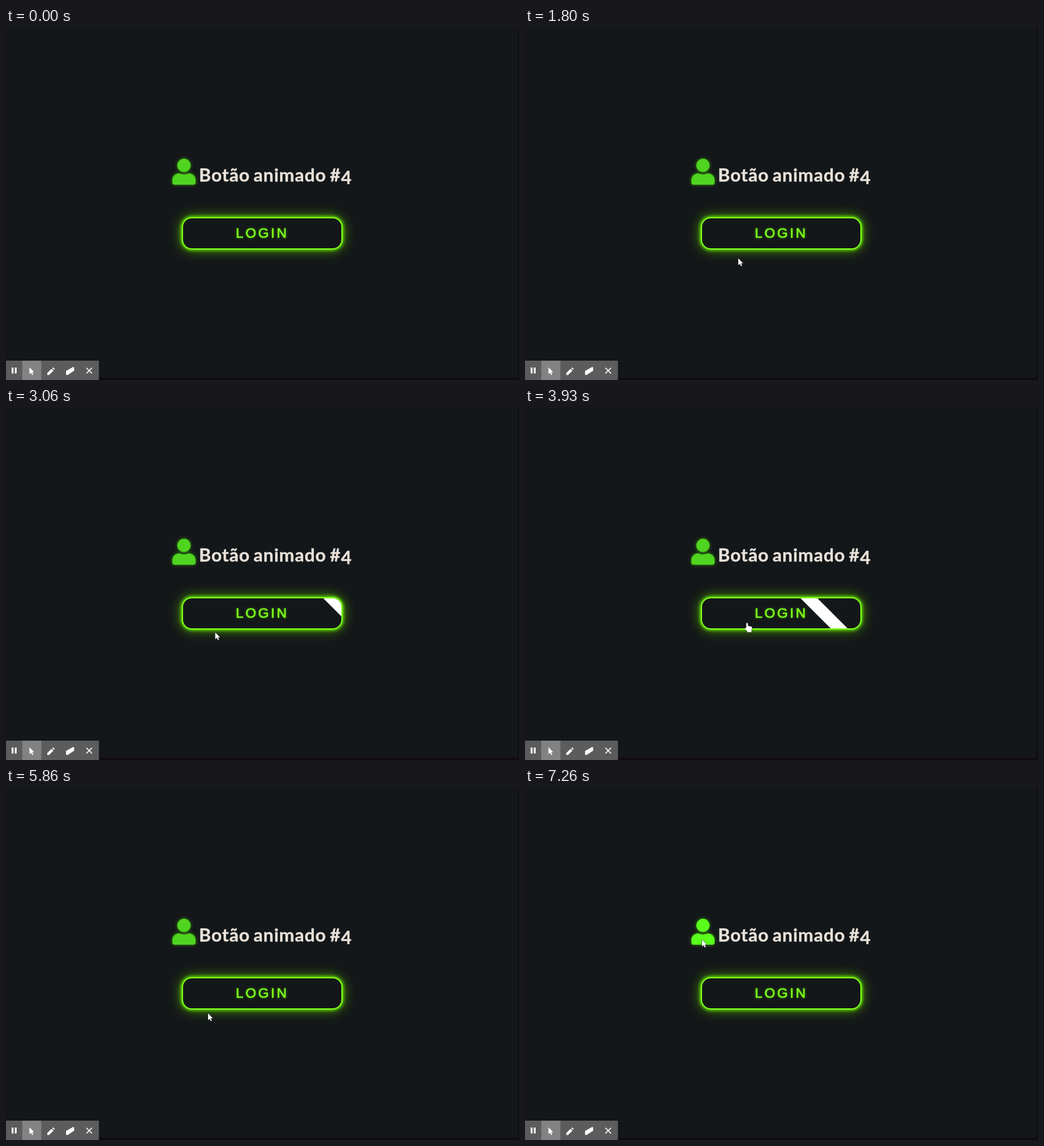
Recreate the animation shown at these times as an HTML page. Size 820 by 564 pixels, loop 8 s.

```html
<!DOCTYPE html>
<html lang="pt">
<head>
<meta charset="utf-8">
<style>
html, body { margin: 0; width: 100%; height: 100%; overflow: hidden; background: #141719; }
#stage { position: relative; width: 820px; height: 564px; overflow: hidden; }
svg { position: absolute; left: 0; top: 0; }
#title {
  font: bold 29px Lato, sans-serif; letter-spacing: .8px; word-spacing: -2px;
  fill: #e9e2da; stroke: #e9e2da; stroke-width: .4px;
}
#user { fill: #4fd41f; filter: drop-shadow(0 0 2.5px #3aa80e); }
#user.hover { fill: #5aff1c; }
#button {
  position: absolute; left: 281px; top: 303px; width: 257px; height: 52px;
  box-sizing: border-box; overflow: hidden;
  border: 2px solid #80ff1c; border-radius: 16px;
  box-shadow: 0 0 5px 1px #6cf808, 0 0 19px 1px #4a9800;
  background: #141719; color: #7dff1c; text-align: center;
  font: 22px/48px "Liberation Sans", Arial, sans-serif; letter-spacing: 3.2px;
  -webkit-text-stroke: .7px #7dff1c; text-shadow: 0 0 4px #3c9600;
}
#stripe {
  position: absolute; left: 0; top: 0; width: 75px; height: 48px; background: #fff;
  clip-path: polygon(0 0, 27px 0, 100% 100%, 48px 100%);
}
</style>
</head>
<body>
<div id="stage">
  <svg width="820" height="564">
    <defs>
      <path id="arrow" d="M0 0V11L2.6 8.7L4.3 12.5L6 11.7L4.4 8H7.6Z"/>
    </defs>
    <rect y="560.5" width="820" height="4" fill="#100b10"/>
    <rect x="818.7" width="2" height="564" fill="#08090a"/>
    <g id="user">
      <circle cx="284.5" cy="220.2" r="10.6"/>
      <path d="M277 233Q284.5 236.6 292 233C299 233 303 238 303 244V247.5Q303 251 299.5 251H269.5Q266 251 266 247.5V244C266 238 270 233 277 233Z"/>
    </g>
    <text id="title" x="308.5" y="246">Botão animado #<tspan dy="4">4</tspan></text>
    <rect y="533" width="148.5" height="31" fill="#5c5c5c"/>
    <rect x="26" y="533" width="30.5" height="31" fill="#828282"/>
    <g fill="#fff">
      <path d="M9 544h3v9.500h-3zM14 544h3v9.500h-3z"/>
      <use href="#arrow" x="37.5" y="543.5"/>
      <path d="M66 556V552.8L73 546L75.800 548.900L68.800 556ZM74 545L75.500 543.800L77.900 546.200L76.700 547.800Z"/>
      <path d="M96 549.5L107 543.2L109 543.8V549L98.500 556L96 555.5Z"/>
      <path d="M128.5 544.5l9 9m0-9l-9 9" stroke="#fff" stroke-width="1.6"/>
    </g>
  </svg>
  <div id="button">LOGIN<div id="stripe"></div></div>
  <svg width="820" height="564">
    <g id="pointer" fill="#fff" stroke="#141719" stroke-width=".8" paint-order="stroke">
      <use id="tip" href="#arrow"/>
      <path id="hand" d="M-1.3 1Q0-.9 1.3 1V4.8L6.5 6Q8 6.5 8 8.2L7 13V15H.3V13.3L-3.4 9.4Q-4 8-2.6 7.6L-1.3 8.4Z"/>
    </g>
  </svg>
</div>
<script>
const $ = id => document.getElementById(id);
const LOOP = 8000, SHOW = 60, SWEEP = 500, LEFT = 160, RIGHT = 580;

// The pointer bobs across the button's lower edge, then visits these stops
const stops = [
  { t: 4300, x: 349, y: 345 },
  { t: 4600, x: 637, y: 383 },
  { t: 4730, x: 690, y: 395 },
  { t: 4930, x: 690, y: 395 },
  { t: 5860, x: 323, y: 361 },
  { t: 7260, x: 283, y: 243 }
];

function pointerAt(t) {
  if (t < stops[0].t) return {
    x: 340 + 15 * Math.cos(2 * Math.PI * (t - 1130) / 2800),
    y: 355 - 14.6 * Math.sin(2 * Math.PI * (t - 2242) / 1493)
  };
  const i = stops.findIndex(s => s.t > t);
  if (i < 0) return stops[stops.length - 1];
  const a = stops[i - 1], b = stops[i];
  const p = (t - a.t) / (b.t - a.t), s = p * p * (3 - 2 * p);
  return { x: a.x + (b.x - a.x) * s, y: a.y + (b.y - a.y) * s };
}

const inside = (p, l, t, r, b) => p.x > l && p.x < r && p.y > t && p.y < b;
const onButton = t => inside(pointerAt(t), 281, 303, 538, 355);

// Times at which the pointer enters and leaves the button, in turn
const toggles = [];
for (let t = SHOW; t < LOOP; t++)
  if (onButton(t) !== (toggles.length % 2 === 1)) toggles.push(t);

// CSS "ease" curve
function ease(x) {
  if (x >= 1) return 1;
  const bez = (a, b, s) => 3 * a * s * (1 - s) ** 2 + 3 * b * s * s * (1 - s) + s ** 3;
  let lo = 0, hi = 1;
  for (let i = 0; i < 20; i++) {
    const mid = (lo + hi) / 2;
    if (bez(.25, .25, mid) < x) lo = mid; else hi = mid;
  }
  return bez(.1, 1, lo);
}

function draw(t) {
  const past = toggles.filter(k => k <= t);
  const over = past.length % 2 === 1;
  const p = past.length ? ease((t - past[past.length - 1]) / SWEEP) : 1;
  const x = LEFT + (RIGHT - LEFT) * (over ? p : 1 - p);
  $("stripe").style.transform = `translateX(${x - 283}px)`;

  const pos = pointerAt(t);
  $("pointer").setAttribute("transform", `translate(${pos.x} ${pos.y})`);
  $("pointer").style.display = t < SHOW ? "none" : "";
  $("hand").style.display = over ? "" : "none";
  $("tip").style.display = over ? "none" : "";
  $("user").classList.toggle("hover", inside(pos, 266, 209, 303, 251));
}

function tick() {
  draw(performance.now() % LOOP);
  requestAnimationFrame(tick);
}
tick();
</script>
</body>
</html>
```
